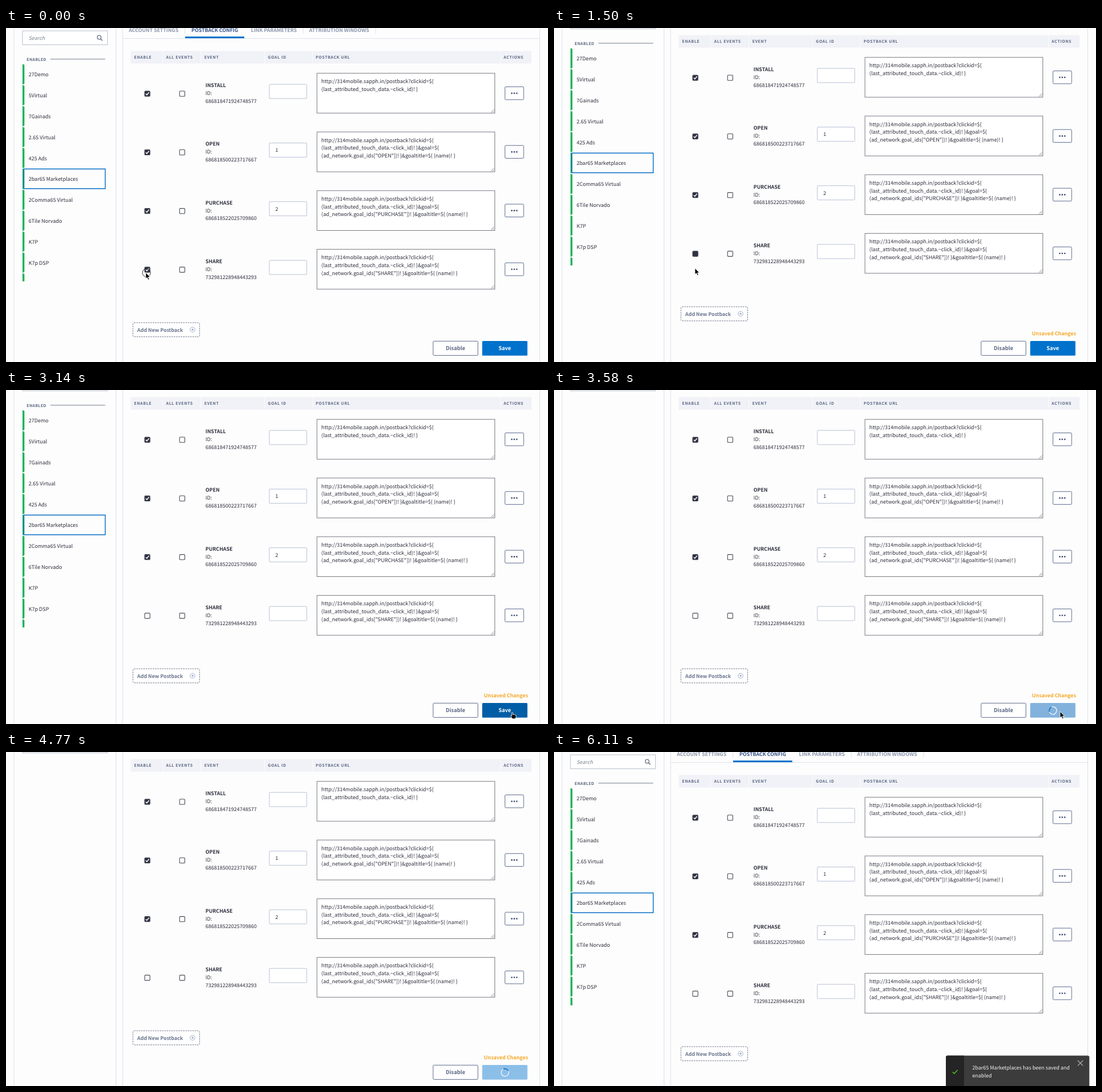
Recreate the animation shown at these times as an HTML page. Size 953x588 px, loop 6.56 s.

```html
<!DOCTYPE html>
<html lang="en">
<head>
<meta charset="utf-8">
<title>Postback settings</title>
<style>
  html, body { margin: 0; width: 100%; height: 100%; overflow: hidden; background: #fdfdfd; }
  svg { display: block; width: 953px; height: 588px; }
  text {
    font-family: "Noto Sans CJK JP", "Noto Sans CJK SC", "Noto Sans", sans-serif;
    text-rendering: geometricPrecision;
    white-space: pre;
  }
</style>
</head>
<body>
<svg id="stage" viewBox="0 0 953 588"></svg>
<script>
const LOOP = 6560, SCROLL = 28;
const INK = '#2c2e3d', SLATE = '#5a6682', BLUE = '#0072cc', LINE = '#dde1ea';
const stage = document.getElementById('stage');

function el(parent, tag, attrs = {}) {
  const node = document.createElementNS('http://www.w3.org/2000/svg', tag);
  for (const k in attrs) node.setAttribute(k, attrs[k]);
  parent.appendChild(node);
  return node;
}
const group = (parent, attrs) => el(parent, 'g', attrs);
const path = (parent, d, stroke, width = 1, more = {}) =>
  el(parent, 'path', { d, fill: 'none', stroke, 'stroke-width': width, ...more });
const circle = (parent, cx, cy, r, more) => el(parent, 'circle', { cx, cy, r, ...more });

// Box given by its edges
function box(parent, x1, y1, x2, y2, fill, stroke = 'none', more = {}) {
  return el(parent, 'rect', { x: x1, y: y1, width: x2 - x1, height: y2 - y1, fill, stroke, ...more });
}
function text(parent, x, y, str, more = {}) {
  const node = el(parent, 'text', { x, y, fill: INK, 'font-size': 9.02, ...more });
  node.textContent = str;
  return node;
}
const bold = (parent, x, y, str, fill, size = 8.85, more = {}) =>
  text(parent, x, y, str, { fill, 'font-size': size, 'font-weight': 600, ...more });
const caps = (parent, x, y, str, spacing) =>
  bold(parent, x, y, str, SLATE, 6.95, { 'letter-spacing': spacing });

// Fixed column edges
for (const x of [14, 193.5, 205, 938.5]) path(stage, `M${x} 0V588`, LINE);

const page = group(stage);

// Side list
box(page, 29, 5, 178.5, 29.5, '#fff', '#b9bfca');
text(page, 39.5, 20.5, 'Search', { fill: '#7d8492', 'font-style': 'italic' });
circle(page, 163.8, 16.5, 3.3, { fill: 'none', stroke: '#666e80', 'stroke-width': 1.3 });
path(page, 'M166.3 19L169.5 22.2', '#666e80', 1.6);

const names = ['27Demo', '5Virtual', '7Gainads', '2.65 Virtual', '425 Ads', '2bar65 Marketplaces',
  '2Comma65 Virtual', '6Tile Norvado', 'K7P', 'K7p DSP'];
const CHOSEN = 5;
const list = group(page);
caps(list, 36.3, 57.5, 'ENABLED', 0.4);
path(list, 'M78 54.8H174.5', '#737b8c');
const bar = (y1, y2, cut) => el(list, 'path', {
  d: `M29 ${y1}L32.4 ${y1 + 1.3}V${y2 - cut}L29 ${y2}Z`, fill: '#1fb25a'
});
names.forEach((name, i) => {
  const top = 63.5 + i * 36.82;
  bar(top, top + 36, 1.3);
  if (i === CHOSEN) box(list, 31, top + 0.6, 174.5, top + 35.2, 'none', '#0b70c6', { 'stroke-width': 1.5 });
  text(list, 39.7, top + 21.8, name);
});
bar(431.7, 446, 0);

// Tabs
const tabs = [[216, 'ACCOUNT SETTINGS'], [326, 'POSTBACK CONFIG'], [430.8, 'LINK PARAMETERS'], [533, 'ATTRIBUTION WINDOWS']];
tabs.forEach(([x, label], i) => bold(page, x, 7.3, label, i === 1 ? '#33518a' : '#8a94ab', 8.82));
path(page, 'M314.5 0V10M522.5 0V10M650 0V10M205 18.5H938', LINE);
box(page, 315, 15, 419, 18, BLUE);

// Table
box(page, 219.5, 40.5, 924, 62.5, '#f1f2f7');
path(page, [275.5, 342.5, 454.5, 538.5, 869.5].map(x => `M${x} 40.5V62.5`).join(''), '#fafbfd');
const heads = [[225.3, 'ENABLE'], [281.5, 'ALL EVENTS'], [348.7, 'EVENT'], [460.5, 'GOAL ID'],
  [544.5, 'POSTBACK URL'], [875, 'ACTIONS']];
heads.forEach(([x, label]) => caps(page, x, 54, label, 0.68));

function checkbox(x, y) {
  const rect = box(page, x - 4.6, y - 4.6, x + 4.6, y + 4.6, '#fff', '#454856', { rx: 1.3, 'stroke-width': 1.1 });
  const tick = path(page, `M${x - 2.7} ${y + 0.2}L${x - 0.8} ${y + 2.2}L${x + 2.9} ${y - 2.4}`, '#fff', 1.5);
  return state => {
    rect.setAttribute('fill', state === 'off' ? '#fff' : '#2e3040');
    tick.setAttribute('visibility', state === 'on' ? 'visible' : 'hidden');
  };
}

const events = [['INSTALL', '686818471924748577', ''], ['OPEN', '686818500223717667', '1'],
  ['PURCHASE', '686818522025709860', '2'], ['SHARE', '732981228948443293', '']];
let setShare;
events.forEach(([name, id, goal], i) => {
  const y = 115.3 + i * 103.3;
  const set = checkbox(248.5, y + 0.3);
  set('on');
  setShare = set;
  checkbox(309.8, y + 0.3)('off');

  bold(page, 350.8, y - 11.3, name, INK);
  text(page, 350.8, y + 2.6, 'ID:');
  text(page, 350.8, y + 16.3, id);

  box(page, 463, y - 16.2, 528.8, y + 8.8, '#fff', '#b8c0d6', { rx: 1 });
  text(page, 473.4, y - 0.4, goal);

  box(page, 546.8, y - 35.6, 859.5, y + 34.6, '#fff', '#777b82');
  path(page, `M852.8 ${y + 33.4}L858.3 ${y + 27.9}M856 ${y + 33.4}L858.3 ${y + 31.1}`, '#777', 0.9);
  const lines = ['http://314mobile.sapph.in/postback?clickid=${',
    '(last_attributed_touch_data.~click_id)! }' + (i ? '&goal=${' : '')];
  if (i) lines.push(`(ad_network.goal_ids["${name}"])! }&goaltitle=\${ (name)! }`);
  lines.forEach((line, n) => text(page, 554.6, y - 18 + n * 13.75, line));

  box(page, 877.3, y - 11.8, 910.2, y + 10.8, '#fff', '#5b6b8e', { rx: 1.5 });
  for (const dx of [-4.4, 0, 4.4]) circle(page, 893.7 + dx, y - 0.4, 1.4, { fill: '#46557a' });
});

box(page, 223.2, 518.8, 340.4, 543.6, '#fff', '#6d7587', { rx: 2, 'stroke-dasharray': '2.6 1.5' });
bold(page, 230.8, 534.5, 'Add New Postback', '#68748d');
circle(page, 328, 531, 4.3, { fill: 'none', stroke: '#97a5c6', 'stroke-width': 0.9 });
path(page, 'M326 531H330M328 529V533', '#8797bd', 1);

// Fixed footer
const unsaved = bold(stage, 840.3, 540.6, 'Unsaved Changes', '#f6a828', 8.95);
box(stage, 751, 551.3, 829.8, 576.4, '#fff', '#5d6b8b', { rx: 1.5 });
bold(stage, 790.4, 567.2, 'Disable', SLATE, 9.4, { 'text-anchor': 'middle' });
const save = box(stage, 837.3, 551, 916.8, 576.7, BLUE, 'none', { rx: 1.5 });
const saveLabel = bold(stage, 877, 567.2, 'Save', '#fff', 9.4, { 'text-anchor': 'middle' });
const spinner = group(stage);
circle(spinner, 0, 0, 6.6, { fill: 'none', stroke: '#e6f0f9', 'stroke-width': 1.5 });
path(spinner, 'M-4.67 -4.67A6.6 6.6 0 0 1 4.67 -4.67', '#0f6fc0', 1.6);

// Toast
const toast = group(stage);
box(toast, 689, 534.6, 941.3, 600, '#3c3c3c', 'none', { rx: 3 });
el(toast, 'path', { d: 'M721 534.6H692Q689 534.6 689 537.6V588H721Z', fill: '#242424' });
path(toast, 'M700.8 563.2L703.6 566.2L709.6 559.8', '#5cc52a', 1.4);
text(toast, 735.5, 559, names[CHOSEN] + ' has been saved and', { fill: '#f4f4f4' });
text(toast, 735.5, 572.8, 'enabled', { fill: '#f4f4f4' });
path(toast, 'M920.8 543L930.2 552.4M930.2 543L920.8 552.4', '#b5b5b5', 1.1);

// Pointer
const pointer = group(stage);
const ring = circle(pointer, 1.3, 0.6, 7.1, { fill: 'none', stroke: '#333', 'stroke-width': 1 });
const shape = { fill: '#000', stroke: '#fff', 'stroke-width': 0.9, 'stroke-linejoin': 'round' };
const arrow = el(pointer, 'path', { d: 'M0 0V11L2.5 8.8L4.3 13L6.2 12.2L4.5 8.1H7.9Z', ...shape });
const hand = el(pointer, 'path', {
  d: 'M0 1Q1 -.4 2 1V4.6Q3 3.6 4 4.7Q5 4 5.9 5.1Q7.6 4.8 7.6 6.6V8.6L6.4 11.8H1.4L-2 7.6Q-2 6 -.6 6.6L0 7.2Z',
  ...shape
});

// start time, x, y, shape, click ring
const moves = [
  [0, 245.7, 430.4, 'arrow', 1], [150, 247.6, 431], [1350, 247.8, 422.6, 'arrow', 1], [1500, 247.8, 422.8],
  [2540, 330, 443], [2690, 560, 497], [2840, 800, 546], [2990, 928, 563],
  [3140, 889.3, 567, 'hand'], [3290, 889.3, 567, 'hand', 1], [3580, 889.8, 566],
  [4320, 899, 570], [4470, 924, 579], [4620, 0, 0, 'none']
];

const show = (node, on) => node.setAttribute('visibility', on ? 'visible' : 'hidden');

function draw(t) {
  const dirty = t >= 1500 && t < 6110;
  const saving = t >= 3580 && t < 6110;
  const over = t >= 3140 && t < 4470;

  page.setAttribute('transform', `translate(0 ${dirty ? -SCROLL : 0})`);
  setShare(t < 1500 ? 'on' : t < 1640 ? 'fill' : 'off');
  list.setAttribute('display', saving ? 'none' : 'inline');
  show(unsaved, dirty);
  show(saveLabel, !saving);
  show(spinner, saving);
  show(toast, t >= 6110);
  save.setAttribute('fill', saving ? (over ? '#82b2dc' : '#8cbfe8') : over ? '#005ea6' : BLUE);

  const step = Math.floor((t - 3575) / 148.75);
  spinner.setAttribute('transform', `translate(877.3 564.3) rotate(${45 + (step - 2) * 55.8})`);

  const [, x, y, kind = 'arrow', click] = moves.filter(m => m[0] <= t).pop();
  pointer.setAttribute('transform', `translate(${x} ${y})`);
  show(arrow, kind === 'arrow');
  show(hand, kind === 'hand');
  show(ring, !!click);
}

const start = performance.now();
function frame() {
  draw((performance.now() - start) % LOOP);
  requestAnimationFrame(frame);
}
draw(0);
requestAnimationFrame(frame);
</script>
</body>
</html>
```
